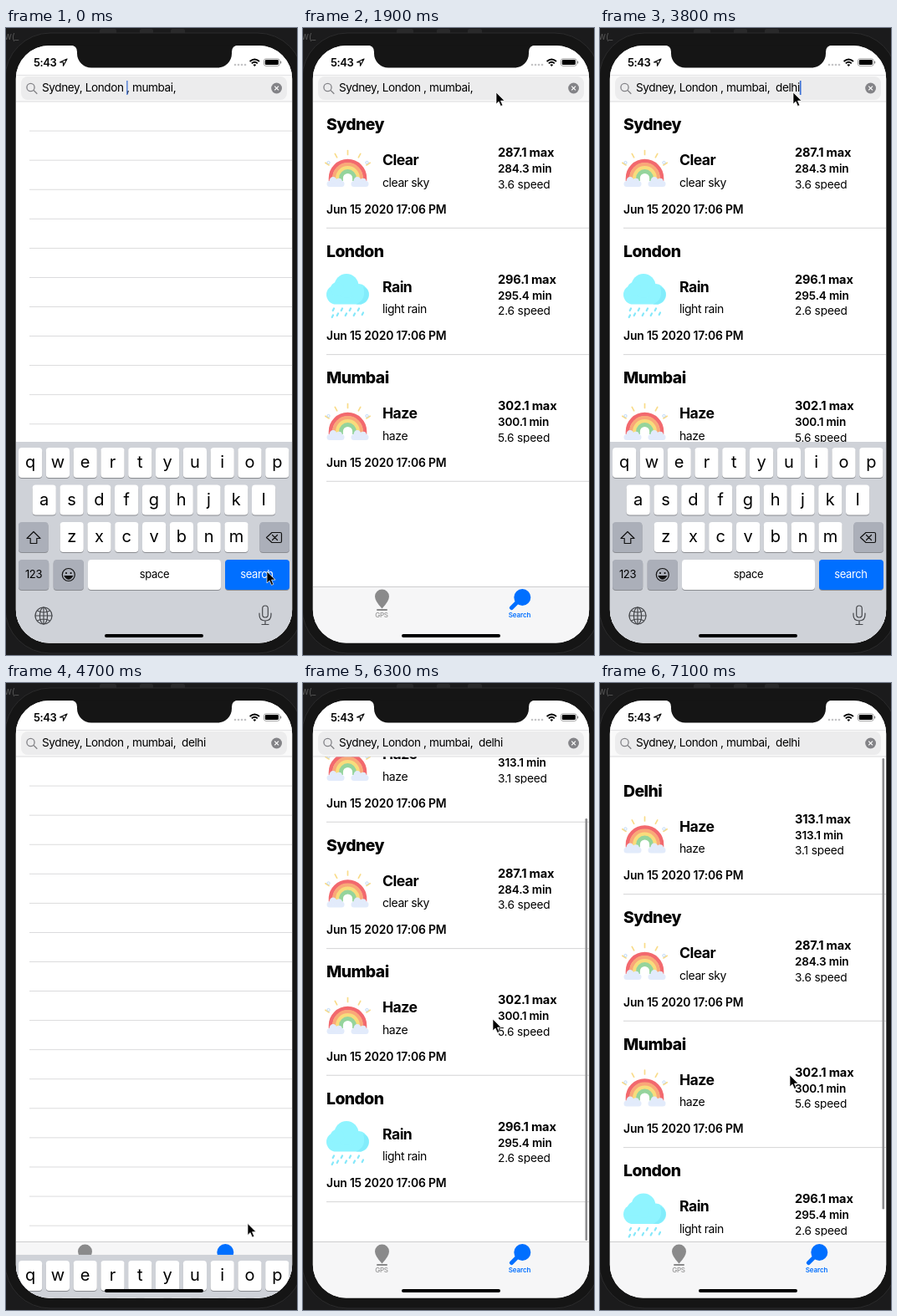
An HTML page that plays this animation: 348x750 px, repeating every 7200 ms.

```html
<!DOCTYPE html>
<html lang="en">
<head>
<meta charset="utf-8">
<title>Weather search</title>
<style>
  html, body { margin: 0; width: 100%; height: 100%; overflow: hidden; background: #1b1b1c; }
  svg { display: block; }
  text { font-family: Inter, sans-serif; letter-spacing: -.03em; white-space: pre; }
  .mid { text-anchor: middle; }
  .num { letter-spacing: -.012em; }
  .key { font-size: 20px; letter-spacing: 0; }
  .label { font-size: 13px; }
  .line { fill: none; stroke: #45474b; stroke-width: 1.2; stroke-linecap: round; stroke-linejoin: round; }
</style>
</head>
<body>
<svg id="stage" width="348" height="750" viewBox="0 0 348 750"></svg>
<script>
const LOOP = 7200, STEP = 100;
const TOP = 88, CELL = 151.5, VIEW = 581;
const BLUE = '#006fff';

const rect = (x, y, w, h, r, fill, extra = '') =>
  `<rect x="${x}" y="${y}" width="${w}" height="${h}" rx="${r}" fill="${fill}" ${extra}/>`;
const text = (x, y, size, weight, str, extra = '') =>
  `<text x="${x}" y="${y}" font-size="${size}" font-weight="${weight}" ${extra}>${str}</text>`;
const circle = (x, y, r, fill) => `<circle cx="${x}" cy="${y}" r="${r}" fill="${fill}"/>`;
const rule = (x, y, color) => rect(x, y - .4, 342 - x, .8, 0, color);

// --- Keyboard ---
const key = (x, y, w, fill, id = '') =>
  rect(x, y + 1, w, 36, 4, '#8a8c91') + rect(x, y, w, 36, 4, fill, id);
const letters = (row, x, y) => [...row].map((c, i) => {
  const left = x + i * 32.8;
  return key(left, y, 28.2, '#fff') + `<text class="key mid" x="${left + 14.1}" y="${y + 24}">${c}</text>`;
}).join('');
const label = (x, str, extra = '') => `<text class="label mid" x="${x}" y="657.5" ${extra}>${str}</text>`;

const keyboard = () => rect(12, 495, 330, 245, 0, '#cfd2d8')
  + letters('qwertyuiop', 15, 502) + letters('asdfghjkl', 31.6, 546.5) + letters('zxcvbnm', 64.6, 591)
  + key(15, 591, 35.5, '#abafb9') + key(303.4, 591, 35.5, '#abafb9')
  + key(15, 636, 36.2, '#abafb9') + key(56.7, 636, 36.2, '#abafb9')
  + key(98, 636, 159, '#fff') + key(262, 636, 77, BLUE, 'id="go"')
  + label(33, '123') + label(177.5, 'space') + label(300, 'search', 'id="goLabel"')
  + `<g class="line" style="stroke:#111">
      <path d="M33 602.5l-8 8h4.2v6h7.6v-6h4.2z"/>
      <path d="M318 603.5h10q1.5 0 1.5 1.5v9q0 1.5-1.5 1.5h-10l-6.5-6z M318.500 606.500l6 6m0-6l-6 6"/>
      <circle cx="74.8" cy="654" r="7.5"/><path d="M70 655.5q4.8 7.5 9.6 0z" fill="#111"/>
    </g>${circle(72, 652, 1.1, '#111')}${circle(77.6, 652, 1.1, '#111')}
    <g class="line"><circle cx="45" cy="703" r="10"/><ellipse cx="45" cy="703" rx="4.6" ry="10"/>
      <path d="M45 693v20M35 703h20M37.5 697q7.500 4 15 0M37.5 709q7.500-4 15 0"/>
      <rect x="306.700" y="691" width="6.6" height="14" rx="3.3"/>
      <path d="M303 700v2q0 7 7 7t7-7v-2M310 709v4.5m-4 0h8"/></g>`;

// --- Weather icons, drawn relative to the top of a cell ---
const cloud = (x, y) => `<g transform="translate(${x} ${y})">
  ${rect(-10.5, -.5, 21, 7, 3.5, '#e2ebfb')}${circle(-3, -1, 4.4, '#e2ebfb')}${circle(4, 0, 3.8, '#e2ebfb')}</g>`;
const arc = (r, color) =>
  `<path d="M${53.5 - r} 95v-3.500a${r} ${r} 0 0 1 ${2 * r} 0v3.500" fill="none" stroke="${color}" stroke-width="4.8"/>`;
const rays = [-58, -29, 0, 29, 58].map(a =>
  `<path d="M53.5 63.500v-5" transform="rotate(${a} 53.5 90)" stroke="#f9dc8a" stroke-width="1.700" stroke-linecap="round"/>`).join('');
const ring = x => `<circle cx="${x}" cy="73" r="1.600" fill="none" stroke="#b4d3f6" stroke-width=".9"/>`;
const rainbow = rays + ring(30.5) + ring(76.5)
  + arc(20.4, '#f2696e') + arc(16, '#f9a878') + arc(12, '#f8dc7c') + arc(8, '#95d49c')
  + cloud(39, 95.5) + cloud(68, 95.5);
const drops = [[36, 96], [46, 96], [56, 96], [66, 96], [41, 102], [51, 102], [61, 102], [35, 104], [71, 101]]
  .map(([x, y]) => `<path d="M${x + 1} ${y}l-1.300 2.600" stroke="#86e8fa" stroke-width="2.200" stroke-linecap="round"/>`).join('');
const rain = rect(28, 68, 51, 23, 11.5, '#8ff4ff') + circle(52, 69, 14.5, '#8ff4ff')
  + circle(41, 73, 8.5, '#8ff4ff') + circle(67, 76, 9.5, '#8ff4ff')
  + '<path d="M72 70q7 3 6.500 10t-9 11h-6q13-6 8.500-21z" fill="#82ecfb"/>' + drops;

// --- Forecast rows ---
const cities = {
  Sydney: ['Clear', 'clear sky', '287.1', '284.3', '3.6'],
  London: ['Rain', 'light rain', '296.1', '295.4', '2.6'],
  Mumbai: ['Haze', 'haze', '302.1', '300.1', '5.6'],
  Delhi: ['Haze', 'haze', '313.1', '313.1', '3.1']
};
const cell = (name, i) => {
  const [state, detail, max, min, speed] = cities[name];
  return `<g transform="translate(0 ${TOP + i * CELL})">`
    + text(28, 34, 19.4, 800, name) + (state === 'Rain' ? rain : rainbow)
    + text(95, 76, 17.6, 700, state) + text(95, 101.5, 14, 400, detail)
    + text(233, 66, 14.6, 700, max + ' max', 'class="num"') + text(233, 85, 13.6, 600, min + ' min', 'class="num"')
    + `<g clip-path="url(#speedClip)">${text(233, 103.5, 13.7, 400, speed + ' speed', 'class="num"')}</g>`
    + text(28, 133.5, 13.9, 600, 'Jun 15 2020 17:06 PM', 'class="num"') + rule(28, CELL - .3, '#c9c9cb') + '</g>';
};
const emptyRows = Array.from({ length: 16 }, (_, i) => rule(28, TOP + 35.07 * (i + 1), '#d3d3d5')).join('');

// --- Fixed chrome ---
const tabBar = rect(12, 668.5, 330, 70, 0, '#f6f6f7') + rule(12, 668.6, '#c2c2c4')
  + `<path d="M94.5 694.500q-8.500-9-8.500-14.500a8.500 8.500 0 0 1 17 0q0 5.500-8.500 14.500z" fill="#8a8a8b"/>`
  + rect(88, 695, 13, 2, 1, '#8a8a8b') + text(94, 705, 8, 500, 'GPS', 'class="mid" fill="#929293"')
  + circle(262.3, 681, 10, BLUE)
  + `<path d="M256 687l-6.500 6.500" stroke="${BLUE}" stroke-width="5" stroke-linecap="round"/>`
  + text(259, 705, 8, 600, 'Search', `class="mid num" fill="${BLUE}"`);

const header = rect(12, 21, 330, 67, 0, '#fff') + rect(12, 56, 330, 32, 0, '#f9f9f9')
  + rule(12, 56.3, '#dcdcde') + rule(12, 88, '#d3d3d5') + rect(18, 58, 318, 28, 8, '#ececed')
  + '<g fill="none" stroke="#828286" stroke-width="1.3"><circle cx="29.5" cy="71" r="4.6"/><path d="M33 74.5l4.3 4.3"/></g>'
  + circle(323.6, 72, 6.4, '#838387')
  + '<path d="M321.2 69.6l4.8 4.8m0-4.8l-4.8 4.8" stroke="#fff" stroke-width="1.2"/>'
  + text(33, 45.5, 13, 600, '5:43')
  + '<path d="M73 37l-8.500 4h4v4.200z" fill="none" stroke="#000" stroke-width="1.2" stroke-linejoin="round"/>'
  + [274, 278, 282, 286].map(x => circle(x, 44, 1.3, '#c4c4c6')).join('')
  + `<g fill="none" stroke="#000" stroke-width="1.9"><path d="M291.6 40q5.700-5.200 11.400 0M293.8 42.4q3.500-3.200 7 0"/></g>
     <path d="M295.4 44q1.900-1.500 3.800 0l-1.900 2z"/>`
  + rect(308.5, 36.8, 18.6, 8.6, 2.4, 'none', 'stroke="#888" stroke-width=".8"')
  + rect(309.8, 38.1, 16, 6, 1.3, '#000') + rect(328, 39.6, 1.2, 3, .6, '#888');

document.getElementById('stage').innerHTML = `
  <defs>
    <clipPath id="screen">${rect(11.7, 21, 330.6, 714.5, 40, '#000')}</clipPath>
    <clipPath id="speedClip">${rect(228, 88, 110, 17.6, 0, '#000')}</clipPath>
  </defs>
  ${rect(0, 0, 348, 750, 0, '#1b1b1c')}
  ${text(-2, 14, 11, 400, 'w(_', 'fill="#555"')}
  ${rect(112, 1, 20, 7, 2, '#29292a')}${rect(160, 1, 16, 7, 2, '#29292a')}${rect(197, 1, 17, 8, 2, '#29292a')}
  ${rect(-1, 6, 356, 742, 54, '#151515', 'stroke="#2b2b2c"')}
  <g clip-path="url(#screen)">
    ${rect(11, 21, 332, 715, 0, '#fff')}
    <g id="list"></g>
    <rect id="bar" x="337.5" width="2.6" rx="1.3" fill="#8c8c8e"/>
    ${header}
    ${text(43, 76.3, 13.6, 400, '', 'id="query"')}
    <rect id="caret" y="63" width="1.7" height="17" fill="#3b6fd4"/>
    ${tabBar}
    <g id="keyboard">${keyboard()}</g>
    ${rect(118, 725, 118, 4, 2, '#000')}
  </g>
  <path d="M77 20.5q8 .5 8 8v2a17 17 0 0 0 17 17h151a17 17 0 0 0 17-17v-2q0-7.500 8-8z" fill="#151515"/>
  <path id="pointer" d="M0 0v14l3.100-3 2.400 5.400 2.300-1-2.300-5.300h4.500z" stroke="#fff" stroke-width=".7"/>`;

const { list, bar, query, caret, pointer, go, goLabel } = Object.fromEntries(
  ['list', 'bar', 'query', 'caret', 'pointer', 'go', 'goLabel'].map(id => [id, document.getElementById(id)]));
const keys = document.getElementById('keyboard');

// --- Motion ---
const clamp = v => Math.max(0, Math.min(1, v));
const easeOut = (t, from, to) => 1 - (1 - clamp((t - from) / (to - from))) ** 3;
const smooth = p => p * p * (3 - 2 * p);

// Each stop is [time, value, value...]; values glide from stop to stop.
function follow(stops, t) {
  const i = stops.findIndex(s => s[0] > t);
  if (i < 0) return stops[stops.length - 1].slice(1);
  const a = stops[i - 1], b = stops[i], p = smooth((t - a[0]) / (b[0] - a[0]));
  return a.slice(1).map((v, k) => v + (b[k + 1] - v) * p);
}
const pointerPath = [
  [0, 312, 650], [800, 312, 650], [1100, 301, 432], [1500, 301, 432], [1900, 231, 77],
  [3900, 231, 77], [4300, 289, 646.5], [5200, 289, 646.5], [5500, 227, 522], [5600, 227, 522],
  [6300, 227, 402], [6400, 227, 402], [7100, 227, 469]
];
const scrollPath = [[0, 0], [5600, 0], [6300, 73], [6400, 73], [7100, -13.5]];

// Arrival time of each result; a new search empties the list.
const arrivals = [
  [1300, 'Sydney'], [1400, 'London'], [1500, 'Mumbai'], [4500],
  [4800, 'Delhi'], [4900, 'Sydney'], [5000, 'Mumbai'], [5200, 'London']
];
const results = t => arrivals.reduce((names, [at, name]) =>
  at > t ? names : name ? [...names, name] : [], []);

function render(t) {
  const names = results(t), [scroll] = follow(scrollPath, t);
  list.innerHTML = names.length ? names.map(cell).join('') : emptyRows;
  list.setAttribute('transform', `translate(0 ${-scroll})`);

  const maxScroll = 4 * CELL - VIEW, inside = Math.max(0, Math.min(maxScroll, scroll));
  const length = 553 - Math.abs(scroll - inside);
  bar.setAttribute('y', 90 + inside / maxScroll * (577 - length));
  bar.setAttribute('height', length);
  bar.setAttribute('opacity', t > 5600 ? 1 : 0);

  const typed = Math.max(0, Math.floor((t - 2500) / 200));
  query.textContent = 'Sydney, London , mumbai, ' + (t >= 2200 ? ' ' : '') + 'delhi'.slice(0, typed);
  const caretAt = t < 800 ? query.getSubStringLength(0, 15) : query.getComputedTextLength();
  const editing = t < 300 || (t >= 2000 && t < 4000) || t === 4400;
  caret.setAttribute('x', 43 + caretAt);
  caret.setAttribute('opacity', editing ? (t < 300 ? .75 : 1) : 0);

  const hidden = t < 1900 ? easeOut(t, 900, 1400)
    : t < 4500 ? 1 - easeOut(t, 1900, 2300) : easeOut(t, 4500, 5000);
  keys.setAttribute('transform', `translate(0 ${241 * hidden})`);
  const pressed = t === 800 || t === 4400;
  go.setAttribute('fill', pressed ? '#fff' : BLUE);
  goLabel.setAttribute('fill', pressed ? '#000' : '#fff');

  pointer.setAttribute('transform', `translate(${follow(pointerPath, t)})`);
}

let shown = -1;
function tick() {
  const t = Math.floor(performance.now() % LOOP / STEP) * STEP;
  if (t !== shown) render(shown = t);
  requestAnimationFrame(tick);
}
tick();
</script>
</body>
</html>
```
